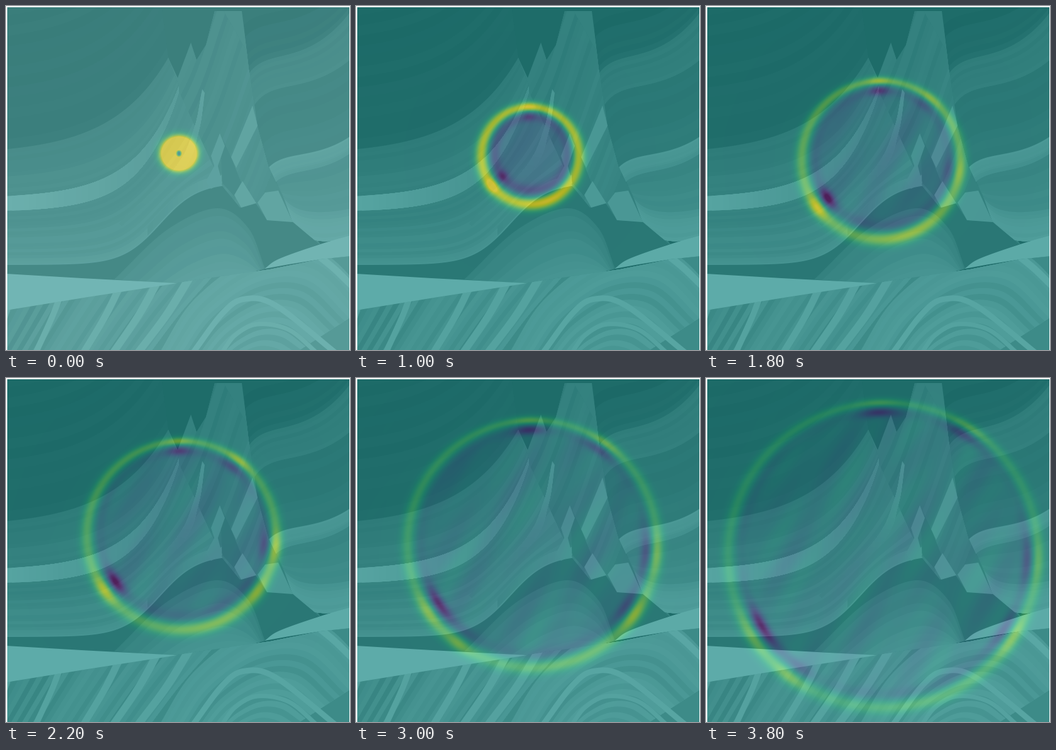
Recreate the animation shown at these times as a matplotlib script. Size 547x546 px, loop 4000 ms.

```python
import numpy as np
import matplotlib.pyplot as plt
from matplotlib.animation import FuncAnimation
from matplotlib.patches import Polygon
from matplotlib.path import Path

W, H, DPI = 547, 546, 128
FRAMES, STEP = 20, 200
X0, Y0, X1, Y1 = 2, 2, 546, 546
SOURCE = (275, 234)

rng = np.random.default_rng(4)
fig = plt.figure(figsize=(W / DPI, H / DPI), dpi=DPI, facecolor="white")
ax = fig.add_axes([X0 / W, 0, (X1 - X0) / W, (Y1 - Y0) / H])
ax.set_xlim(X0, X1)
ax.set_ylim(Y1, Y0)
ax.axis("off")


# ---- drawing helpers -----------------------------------------------------

def smooth(*pts, n=90):
    """Catmull-Rom curve through pts."""
    p = np.array(pts, float)
    p = np.vstack([2 * p[0] - p[1], p, 2 * p[-1] - p[-2]])
    u = np.linspace(0, len(pts) - 1, n)
    i = np.minimum(u.astype(int), len(pts) - 2)
    f = (u - i)[:, None]
    a, b, c, d = p[i], p[i + 1], p[i + 2], p[i + 3]
    return 0.5 * (2 * b + (c - a) * f + (2 * a - 5 * b + 4 * c - d) * f**2
                  + (3 * b - a - 3 * c + d) * f**3)


def graph(func, x0, x1, n=90):
    x = np.linspace(x0, x1, n)
    return np.column_stack([x, func(x)])


def fill(pts, gray, clip=None):
    patch = Polygon(pts, fc=str(np.clip(gray / 255, 0, 1)), lw=0)
    ax.add_patch(patch)
    if clip is not None:
        patch.set_clip_path(Path(clip), ax.transData)


def strata(a, b, n, g0, g1, jitter=0, clip=None):
    """n layers between two curves, painted from the top down."""
    for f in np.arange(n) / n:
        gray = g0 + (g1 - g0) * f + rng.uniform(-jitter, jitter)
        fill(np.vstack([a + (b - a) * f, b[::-1]]), gray, clip)


def ribbon(a, b, g0, g1):
    """Band between two curves whose tone fades along its length."""
    for i in range(0, len(a) - 3, 3):
        gray = g0 + (g1 - g0) * i / len(a)
        fill(np.vstack([a[i:], b[i:][::-1]]), gray)


def line(pts, gray, px, clip=None):
    art, = ax.plot(*pts.T, color=str(gray / 255), lw=px * 72 / DPI)
    if clip is not None:
        art.set_clip_path(Path(clip), ax.transData)


# ---- left flank and faulted middle ---------------------------------------

def flank(level, rise, x_end, scale):
    """Flat layer that bends upward toward the fault at x_end."""
    return graph(lambda x: level - rise * np.exp((x - x_end) / scale), 0, x_end)


def floor(x):
    return 410 - 130 / (1 + np.exp((245 - x) / 30))


horizon = flank(236, 154, 258, 90)
band_top = flank(305, 177, 275, 69)
band_low = flank(327, 191, 275, 60)
crest = graph(floor, 0, 343)

fill([(0, 0), (W, 0), (W, H), (0, H)], 28)
strata(horizon - [30, 225], horizon, 14, 20, 34, 5)

peaks = [(258, 82), (273, 114), (294, 58), (303, 86), (318, 62), (332, 8), (375, 8),
         (388, 110), (418, 255), (440, 300), (500, 378), (300, 400), (200, 300)]
fill(peaks, 98)
strata(smooth((215, 230), (285, 110), (330, -20)),
       smooth((330, 440), (395, 330), (450, 190)), 26, 84, 116, 12, peaks)

strata(horizon, band_top, 12, 76, 104, 7)
strata(band_low, crest, 18, 98, 145, 11)
ribbon(band_top, band_low, 212, 135)


# ---- right flank ---------------------------------------------------------

def bend(x0, level, step, climb):
    """Layer that steps quickly beside the fault, then climbs at the edge."""
    return graph(lambda x: level - step * (1 - np.exp((x0 - x) / 20))
                 - climb * ((x - x0) / (550 - x0)) ** 3, x0, 550)


right = [(375, 2), (388, 110), (400, 190), (418, 255), (440, 300), (456, 343),
         (500, 379), (546, 366), (546, 2)]
folds = [bend(370, 40, 30, 70), bend(384, 110, 30, 74), bend(392, 162, 34, 45),
         bend(416, 258, 22, 31), bend(424, 284, 22, 30), bend(438, 300, -30, 9),
         bend(455, 343, -35, 13)]
tones = [(24, 48), (84, 94), (66, 88), (168, 150), (108, 140), (160, 195)]
for top, low, (g0, g1) in zip(folds, folds[1:], tones):
    strata(top, low, 8, g0, g1, 8, right)


# ---- crest, dome and displaced blocks ------------------------------------

fill(np.vstack([crest, [(372, 320), (397, 313), (415, 340), (455, 342), (498, 378),
                        (450, 396), (411, 417), (300, 440), (0, 440)]]), 66)
edge = graph(floor, 225, 343)
ribbon(edge - [0, 16], edge, 125, 165)
line(crest, 160, 2)
strata(smooth((172, 434), (255, 356), (335, 321), (385, 352), (412, 417)),
       smooth((285, 442), (315, 436), (345, 430), (370, 426), (395, 421)),
       9, 98, 168, 8)

ribbon(smooth((312, 132), (299, 195), (268, 258), (180, 345)),
       smooth((316, 138), (306, 200), (281, 260), (184, 349)), 165, 118)

blocks = [
    ([(340, 202), (358, 240), (374, 280), (363, 302), (344, 281)], 84),
    ([(392, 158), (400, 190), (366, 257), (358, 240)], 168),
    ([(340, 202), (348, 222), (334, 262), (326, 238)], 158),
    ([(335, 247), (344, 281), (326, 290), (318, 278)], 160),
    ([(376, 278), (398, 313), (374, 320), (363, 300)], 176),
    ([(400, 312), (412, 296), (433, 293), (456, 343), (415, 340)], 172),
]
for pts, gray in blocks:
    fill(pts, gray)


# ---- folded basement and salt --------------------------------------------

base = [(2, 482), (130, 462), (300, 435), (420, 418), (500, 402), (546, 397),
        (546, 546), (2, 546)]
fill(base, 130)
strata(smooth((-30, 440), (-55, 500), (-85, 560)),
       smooth((332, 425), (275, 490), (222, 560)), 36, 125, 152, 24, base)
for x in (12, 92, 182, 238, 285):
    run = 34 + 0.17 * x
    stripe = smooth((x, 430), (x - 0.45 * run, 490), (x - run, 550))
    strata(stripe, stripe + [8 + x / 40, 0], 1, 205, 205, clip=base)
strata(smooth((238, 560), (300, 465), (400, 395), (500, 390), (585, 470)),
       smooth((365, 560), (385, 552), (405, 548), (425, 552), (445, 560)),
       18, 165, 172, 20, base)
line(smooth((296, 552), (345, 487), (380, 465), (430, 476), (526, 552)), 215, 9, base)
line(smooth((342, 552), (365, 522), (400, 505), (450, 514), (496, 552)), 205, 7, base)
line(smooth((495, 395), (522, 417), (550, 444)), 220, 11, base)

fill([(0, 425), (120, 432), (272, 440), (130, 462), (0, 483)], 236)
fill(np.vstack([smooth((411, 417), (435, 401), (500, 378), (548, 364)),
                [(548, 397), (500, 402), (450, 410)]]), 232)


# ---- wave ----------------------------------------------------------------

xs, ys = np.meshgrid(np.arange(X0, X1) + 0.5, np.arange(Y0, Y1) + 0.5)
dx, dy = xs - SOURCE[0], ys - SOURCE[1]
dist, angle = np.hypot(dx, dy), np.arctan2(dy, dx)
east, south = np.cos(angle), np.sin(angle)
across, along = 0.8 * dx + 0.6 * dy, 0.6 * dx - 0.8 * dy


def pulse(x, width):
    return np.exp(-(x / width) ** 2)


def lobe(deg, width):
    return pulse((np.degrees(angle) - deg + 180) % 360 - 180, width)


# angle, spread, gain of the crest, depth of the trough, step it starts to show
SPOTS = [(270, 9, 0.5, 0.55, 3), (139, 9, 0.9, 0.8, 3), (68, 28, 0.4, 0.1, 3),
         (313, 9, 0.7, 0.4, 7), (13, 10, 0.7, 0.45, 7), (40, 8, 1.0, 0.35, 9),
         (121, 6, 1.0, 0.25, 12)]
LOBES = [(lobe(a, s), crest, trough, t0) for a, s, crest, trough, t0 in SPOTS]


def wave(t):
    # deeper rock is faster, so the front stretches downward
    front = 15 + 12.6 * t - 0.035 * t**2 + 0.36 * t * east + 0.131 * t**2 * south
    age = max(t, 1.4) / 3
    start = np.clip((t - 0.5) / 2, 0, 1)
    gain, depth = 1, 0.6 * age**-1.2
    for shape, crest_gain, trough, t0 in LOBES:
        grow = np.clip((t - t0) / 4, 0, 1)
        gain = gain + grow * crest_gain * shape
        depth = depth + grow * trough * shape
    width = 9.5 + 1.5 * east**2 + 2.5 * south * min(t / 8, 1) + max(0, 3 - t)
    gap = 18 + 3 * south - 2 * east

    drift = 0.25 * t
    mottle = (np.sin(0.075 * across - drift) * np.sin(0.02 * along + 1)
              + 0.6 * np.sin(0.12 * across + 0.02 * along + drift))
    body = -0.4 * start * age**-1.1 + 0.07 * np.clip((t - 3) / 4, 0, 1) * mottle
    inside = 1 / (1 + np.exp(np.clip((dist - front + 14) / 4, -50, 50)))

    w = 1.25 * age**-0.8 * gain * pulse(dist - front, width)
    w -= start * depth * pulse(dist - front + gap, 9 + south)
    w += body * inside
    return w - 0.8 * pulse(dist, 6) * (t == 0)


field = ax.imshow(wave(0), cmap="viridis", vmin=-1, vmax=1, alpha=0.7,
                  extent=(X0, X1, Y1, Y0), aspect="auto", zorder=5)
veil = ax.add_patch(plt.Rectangle((X0, Y0), X1 - X0, Y1 - Y0, fc="white",
                                  lw=0, alpha=0.13, zorder=6))


def update(t):
    field.set_data(wave(t))
    veil.set_visible(t == 0)
    return field, veil


anim = FuncAnimation(fig, update, frames=FRAMES, interval=STEP, repeat=True,
                     repeat_delay=0, blit=False)
plt.show()
```
